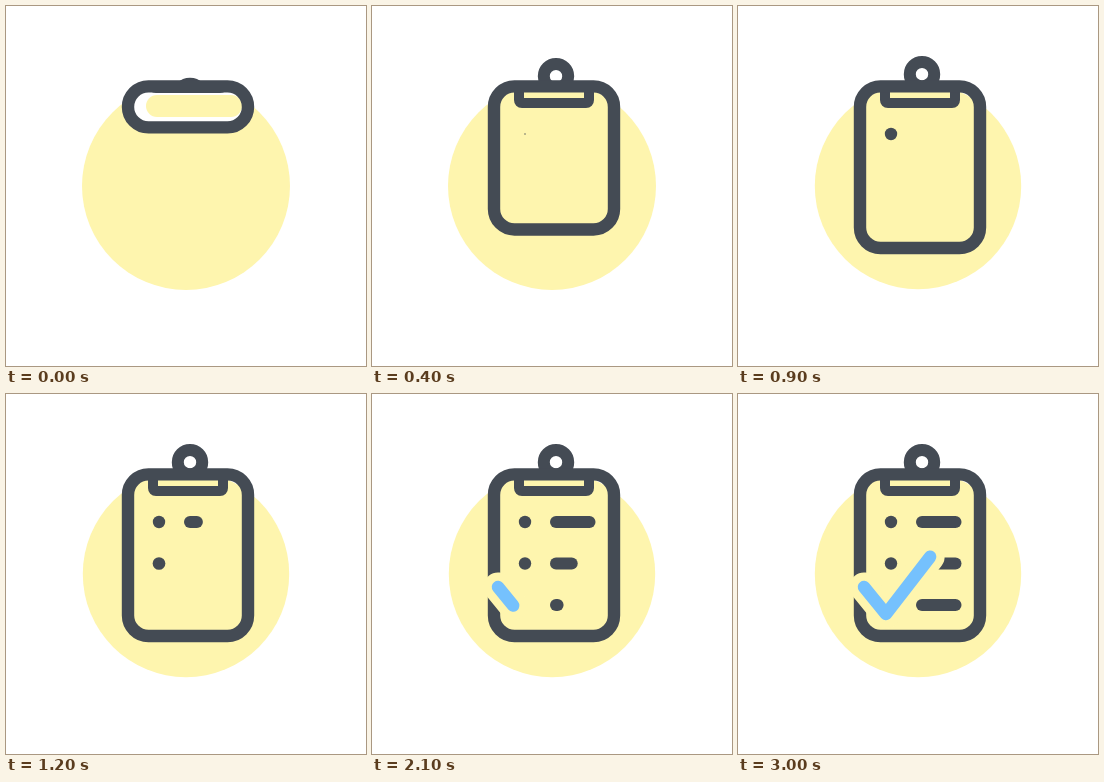
Write an HTML page that moves like this. It is 360 px wide and 360 px high and loops after 4.4 s.

```html
<!DOCTYPE html>
<html>
<head>
<meta charset="utf-8">
<style>
html, body { margin: 0; width: 100%; height: 100%; overflow: hidden; background: #fff; }
svg { display: block; width: 100vw; height: 100vh; }
</style>
</head>
<body>
<svg viewBox="0 0 360 360" fill="none" stroke-linecap="round" stroke-linejoin="round">
  <clipPath id="above"><path d="M150 0H220V80H150Z"/></clipPath>
  <clipPath id="below"><path d="M130 80H234V120H130Z"/></clipPath>
  <circle id="disc" cx="180" cy="180" fill="#fef5ae"/>
  <g id="gap">
    <rect x="122" y="81" width="120" height="40" rx="20" fill="#fff"/>
    <rect x="140" y="89" width="96" height="22" rx="11" fill="#fef5ae"/>
  </g>
  <g stroke="#444b54" stroke-width="12">
    <g clip-path="url(#above)"><circle id="ring" cx="184" r="12.2"/></g>
    <g clip-path="url(#below)"><path id="clip" stroke-width="10"/></g>
    <rect id="board" x="122" y="80.4" width="120" rx="20.5" stroke-width="12.4"/>
    <path id="dash0"/><path id="dash1"/><path id="dash2"/>
  </g>
  <g fill="#444b54">
    <circle id="dot0" cx="153" cy="128"/>
    <circle id="dot1" cx="153" cy="169.5"/>
  </g>
  <path id="halo" stroke="#fef5ae" stroke-width="29"/>
  <path id="check" stroke="#75c1fd" stroke-width="12.5"/>
</svg>
<script>
const LOOP = 4400, STEP = 100, END = 3000;
const el = id => document.getElementById(id);
const set = (id, name, value) => el(id).setAttribute(name, value);
const show = (id, on) => set(id, 'visibility', on ? 'visible' : 'hidden');

// Smooth move from a to b between times t0 and t1
function ease(t, t0, t1, a, b) {
  const p = Math.min(1, Math.max(0, (t - t0) / (t1 - t0)));
  return a + (b - a) * p * p * (3 - 2 * p);
}

// Move to a peak, then settle back
const spring = (t, t0, peakAt, t1, a, peak, b) =>
  t < peakAt ? ease(t, t0, peakAt, a, peak) : ease(t, peakAt, t1, peak, b);

function checkPath(len) {
  const first = 34.8, k = Math.min(1, len / first), rest = Math.max(0, len - first);
  let d = `M126 193L${126 + 22 * k} ${193 + 27 * k}`;
  if (rest) d += `L${148 + rest * .611} ${220 - rest * .792}`;
  return d;
}

function draw(t) {
  show('gap', t < STEP);
  set('disc', 'r', ease(t, 600, 900, 104, 103.2));
  set('board', 'height', spring(t, 0, 600, 900, 41, 178.8, 161.6));
  set('ring', 'cy', spring(t, 0, 600, 900, 90, 63.3, 68.2));
  const y = ease(t, 0, 350, 82, 97);
  set('clip', 'd', `M147 ${y - 30}V${y - 3}Q147 ${y} 150 ${y}H214Q217 ${y} 217 ${y - 3}V${y - 30}`);

  [350, 1000].forEach((t0, i) =>
    set('dot' + i, 'r', spring(t, t0, t0 + 270, t0 + 500, 0, 7.6, 6.2)));

  [[128, 1080], [169.5, 1900], [211, 2050]].forEach(([cy, t0], i) => {
    show('dash' + i, t > t0 - 50);
    set('dash' + i, 'd', `M184 ${cy}H${ease(t, t0, t0 + 420, 184.3, 217.5)}`);
  });

  const on = t >= 2000;
  const d = checkPath(spring(t, 1950, 2500, 2800, .1, 130.5, 107));
  for (const id of ['halo', 'check']) {
    show(id, on);
    set(id, 'd', d);
  }
}

const start = performance.now();
function tick() {
  const t = (performance.now() - start) % LOOP;
  draw(Math.min(END, Math.floor(t / STEP) * STEP));
  requestAnimationFrame(tick);
}
tick();
</script>
</body>
</html>
```
